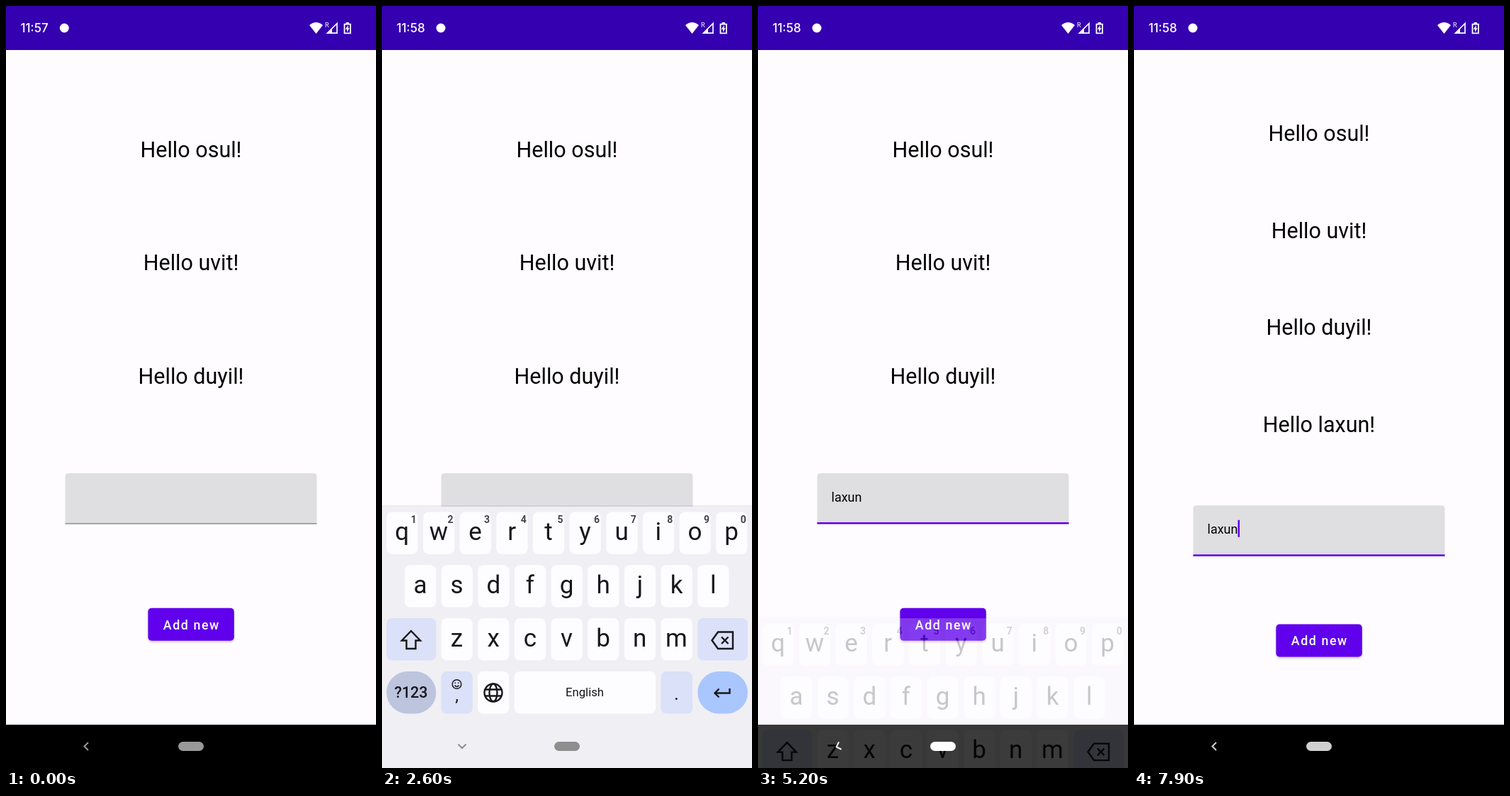
An HTML page for the animation above (8000 ms loop, 522 by 1073 pixels).

```html
<!DOCTYPE html>
<html lang="en">
<head>
<meta charset="utf-8">
<style>
  html, body { margin: 0; width: 100%; height: 100%; overflow: hidden; background: #fefcff; }
  svg { display: block; width: 100%; height: 100%; font-family: Roboto, sans-serif; }
  .mid { text-anchor: middle; }
  .line { fill: none; stroke: #17171b; stroke-width: 2.4; }
  .greeting { font-size: 30.5px; }
  .letter { font-size: 35px; fill: #17171b; }
  .hint { font-size: 14px; font-weight: 700; fill: #45454a; }
  .lift { filter: drop-shadow(0 2px 1.5px #0003); }
</style>
</head>
<body>
<svg viewBox="0 0 522 1073">
  <clipPath id="buttonShape"><rect x="200.400" y="847.800" width="121.400" height="46" rx="5"/></clipPath>
  <rect width="522" height="1073" fill="#fefcff"/>

  <rect width="522" height="62" fill="#3500b0"/>
  <g fill="#fff">
    <text id="clock" x="20.500" y="37.200" style="font: 500 17px Inter, sans-serif"></text>
    <circle id="notice" cy="31" r="6.500"/>
    <path d="M428 27Q437.500 19 447 27L437.500 39Z"/>
    <text x="450" y="30" font-size="9">R</text>
    <path d="M467 24.500V38.200H453.500Z" fill="none" stroke="#fff" stroke-width="1.700"/>
    <path d="M460 31V38H453Z"/>
    <path d="M477.500 25.700h8.400v12.600h-8.400z" fill="none" stroke="#fff" stroke-width="1.800"/>
    <path d="M479.500 23h4.400v2.500h-4.400zM482.700 27L478.800 32.800H481V37L484.600 31.200H482.700Z"/>
  </g>

  <g id="greetings"></g>

  <g id="field">
    <path d="M83.500 729.500V663q0-5 5-5H433.500q5 0 5 5V729.500Z" fill="#dfdee0"/>
    <rect id="fieldLine" x="83.500" width="355"/>
    <text id="typed" x="103.500" y="697.500" font-size="18"></text>
    <rect id="composing" x="103.500" y="699" height="1.300"/>
    <rect id="cursor" y="678.500" width="2.500" height="24" fill="#6000ec"/>
  </g>

  <g id="button">
    <rect class="lift" x="200.400" y="847.800" width="121.400" height="46" rx="5" fill="#6000ec"/>
    <g clip-path="url(#buttonShape)"><circle id="ripple" cx="268" cy="876" fill="#fff"/></g>
    <text x="221.800" y="877.500" font-size="17.800" font-weight="500" letter-spacing="1.590" fill="#fff">Add new</text>
  </g>

  <rect y="1012" width="522" height="61"/>

  <g id="keyboard">
    <rect y="703" width="522" height="4" fill="#0001"/>
    <rect y="705" width="522" height="368" fill="#f0eff4"/>
    <g id="keys"></g>
    <path class="line" d="M41 880L28 893.500H34.500V905H47.500V893.500H54Z"/>
    <path class="line" d="M474 881.500H495V905H474L465.500 893.200ZM479 888.500l9.500 9.500m0-9.500l-9.500 9.500"/>
    <g class="line">
      <circle cx="157" cy="967" r="12.500"/>
      <ellipse cx="157" cy="967" rx="5.500" ry="12.500"/>
      <path d="M145.500 962.500h23m-23 9h23"/>
      <path d="M490.500 961V967.500H470M475.500 961.500L469.500 967.500L475.500 973.500"/>
    </g>
    <circle class="line" cx="105.500" cy="955" r="6.300" style="stroke-width: 1.500px"/>
    <path class="line" d="M102.500 956.500q3 4 6 0M103.300 952.500v1.500m4.400-1.500v1.500" style="stroke-width: 1.500px"/>
    <g class="mid" fill="#17171b">
      <text x="105.500" y="979" font-size="24">,</text>
      <text x="415.500" y="977" font-size="26">.</text>
      <text x="41" y="974" font-size="21.500" font-weight="500">?123</text>
      <text x="286" y="972" font-size="16.700">English</text>
    </g>
    <g id="popup">
      <rect class="lift" x="-49" y="-80" width="98" height="73" rx="16" fill="#fdfcff"/>
      <text id="popupLetter" class="letter mid" y="-33" style="font-size: 42px"></text>
    </g>
  </g>

  <path id="back" d="M116 1037L110.500 1042.500L116 1048" fill="none" stroke-width="2"/>
  <rect id="pill" x="243" y="1036" width="36" height="13" rx="6.500"/>
</svg>

<script>
const LOOP = 8000, PITCH = 51.65;
const ADDED = 6900, FOCUS = 1650, SHOW = 1900, HIDE = 5083, SLIDE = 200;
const NAMES = ['osul', 'uvit', 'duyil', 'laxun'];
const STROKES = [['l', 2800, 3000], ['a', 3200, 3400], ['x', 3500, 3700], ['u', 3900, 4100], ['n', 4400, 4500]];
const WHITE = '#fdfcff', TINT = '#dae1f8';
const $ = id => document.getElementById(id);
const clamp = v => Math.min(1, Math.max(0, v));
const mix = (a, b, p) => `rgb(${a.map((v, i) => Math.round(v + (b[i] - v) * p))})`;
const gray = v => `rgb(${v},${v},${v})`;
const move = (id, x, y) => $(id).setAttribute('transform', `translate(${x} ${y})`);
const show = (id, on) => $(id).setAttribute('visibility', on ? 'visible' : 'hidden');

// Cubic easing with control points (x1, 0) and (x2, 1).
function ease(x1, x2, p) {
  let low = 0, high = 1;
  for (let i = 0; i < 20; i++) {
    const s = (low + high) / 2, r = 1 - s;
    if (3 * r * r * s * x1 + 3 * r * s * s * x2 + s ** 3 < p) low = s; else high = s;
  }
  return low * low * (3 - 2 * low);
}
const accelerate = p => ease(0.4, 1, p);
const decelerate = p => ease(0, 0.2, p);

const keyRect = (x, y, width, fill, rx = 8, id = '') =>
  `<rect id="${id}" x="${x}" y="${y}" width="${width}" height="59.5" rx="${rx}" fill="${fill}"/>`;

const keys = {};
let markup = '';
['qwertyuiop', 'asdfghjkl', 'zxcvbnm'].forEach((row, r) => {
  const y = 712.4 + r * 74.8;
  [...row].forEach((letter, i) => {
    const x = [6.3, 32, 83.5][r] + i * PITCH, center = x + 22;
    keys[letter] = { x: center, y, row: r };
    markup += keyRect(x, y, 44.3, WHITE, 8, 'key-' + letter) +
      `<text class="letter mid" x="${center}" y="${y + 39.5}">${letter}</text>`;
    if (!r) markup += `<text class="hint mid" x="${center + 16.5}" y="728">${(i + 1) % 10}</text>`;
  });
});
markup += keyRect(6.3, 862, 70, TINT) + keyRect(445.3, 862, 70.7, TINT) +
  keyRect(6.3, 937, 70, '#bdc4de', 30) + keyRect(83.5, 937, 44.3, TINT) +
  keyRect(135, 937, 44.3, WHITE) + keyRect(186.5, 937, 199.5, WHITE) +
  keyRect(393.5, 937, 44.5, TINT) + keyRect(445.3, 937, 70.7, '#a9c6ff', 30);
$('keys').innerHTML = markup;
$('greetings').innerHTML = NAMES.map(name => `<text class="greeting mid" x="261">Hello ${name}!</text>`).join('');

function drawPage(t) {
  const added = t >= ADDED;
  [...$('greetings').children].forEach((text, i) => {
    text.setAttribute('y', added ? 190.2 + i * 136.6 : 213 + i * 159.3);
    text.setAttribute('visibility', i < 3 || added ? 'visible' : 'hidden');
  });
  move('field', 0, added ? 45.3 : 0);
  move('button', 0, added ? 22.7 : 0);
  const spread = clamp((t - ADDED) / 225);
  $('ripple').setAttribute('r', added ? 14 + 60 * spread : 0);
  $('ripple').setAttribute('opacity', 0.12 * clamp((7400 - t) / 275));
  $('clock').textContent = t < 1000 ? '11:57' : '11:58';
  $('notice').setAttribute('cx', t < 1000 ? 82.3 : 83);
}

function drawField(t) {
  const focus = clamp((t - FOCUS) / 150), height = 1.2 + 1.3 * focus;
  $('fieldLine').setAttribute('y', 729.5 - height);
  $('fieldLine').setAttribute('height', height);
  $('fieldLine').setAttribute('fill', mix([125, 124, 127], [96, 0, 236], focus ** 2));

  $('typed').textContent = STROKES.filter(([, down]) => t >= down + 100).map(([letter]) => letter).join('');
  const width = $('typed').getComputedTextLength();
  $('composing').setAttribute('width', width);
  show('composing', t < HIDE - 80);
  $('cursor').setAttribute('x', 103.6 + width);
  const blinkOn = t < 4500 ? t >= FOCUS && (t < 2150 || t >= 2650) : Math.floor(t / 500) % 2 === 1;
  show('cursor', blinkOn);
}

function drawKeyboard(t) {
  const opening = clamp((t - SHOW) / SLIDE), closing = clamp((t - HIDE) / SLIDE);
  const shown = t < HIDE ? decelerate(opening) : 1 - accelerate(closing);
  const alpha = t < HIDE ? accelerate(Math.min(1, 2 * opening)) : accelerate(1 - closing);
  move('keyboard', 0, (1 - shown) * 368);
  $('keyboard').setAttribute('opacity', alpha);
  show('keyboard', alpha > 0);

  let pressed = '';
  for (const [letter, down, up] of STROKES) {
    const active = t >= down && t < up;
    if (active) pressed = letter;
    $('key-' + letter).setAttribute('fill', active && keys[letter].row ? '#e3e2e8' : WHITE);
  }
  $('popup').setAttribute('display', pressed ? 'inline' : 'none');
  if (pressed) {
    move('popup', keys[pressed].x, keys[pressed].y);
    $('popupLetter').textContent = pressed;
  }
}

function drawNavigation(t) {
  const turn = t < HIDE ? clamp((t - SHOW) / SLIDE) : 1 - clamp((t - HIDE + 40) / SLIDE);
  const dim = clamp((t - 7800) / 100);
  const tone = t < SHOW ? 153 : t < HIDE ? 142 : 255 - 47 * dim;
  $('pill').setAttribute('fill', gray(tone));
  $('back').setAttribute('stroke', gray(tone));
  $('back').setAttribute('transform', `rotate(${-90 * turn} 113 1042.5)`);
}

function frame(now) {
  const t = now % LOOP;
  drawPage(t);
  drawField(t);
  drawKeyboard(t);
  drawNavigation(t);
  requestAnimationFrame(frame);
}
frame(performance.now());
</script>
</body>
</html>
```
